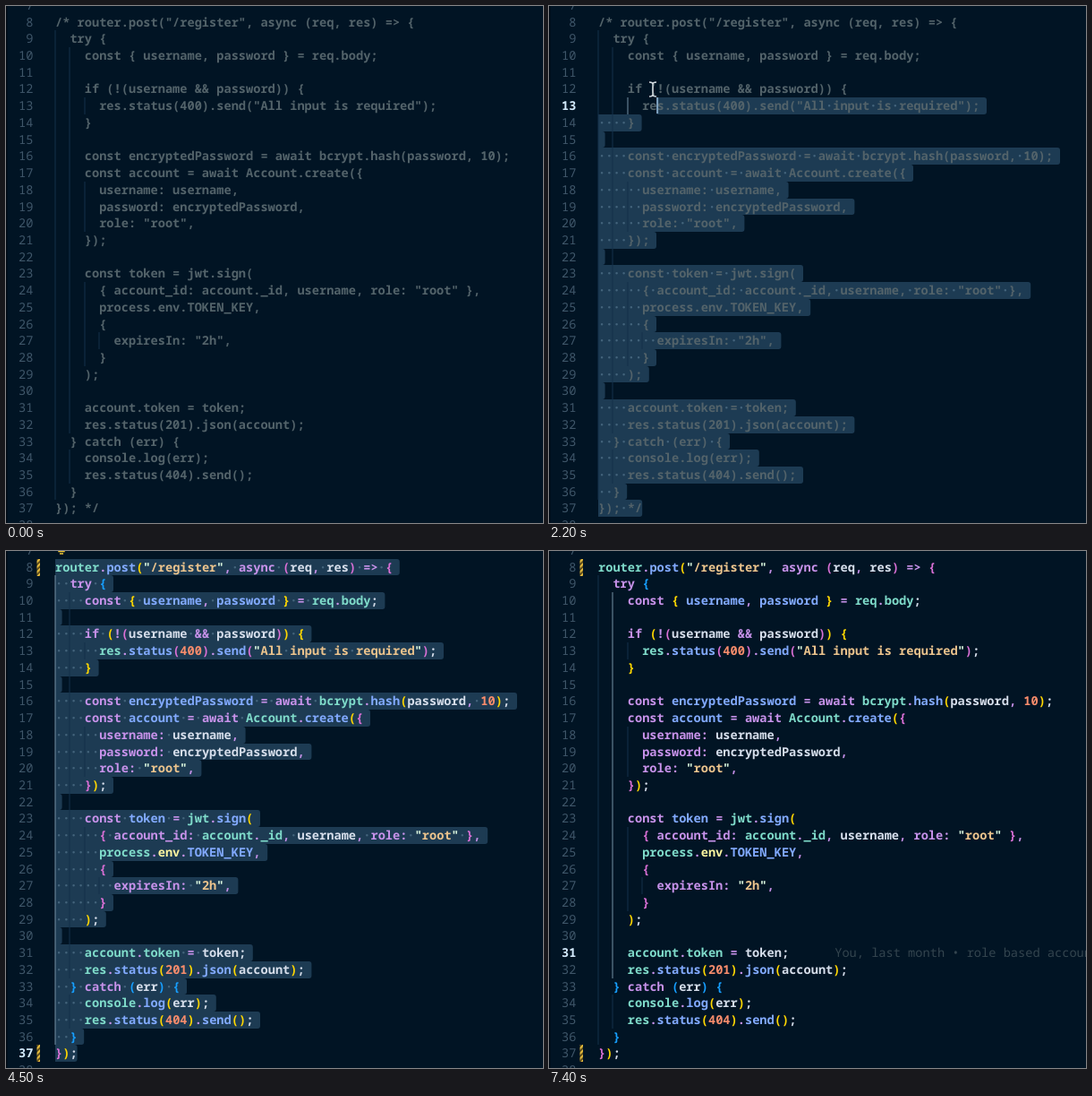
Animation, 600 px wide and 577 px high, one loop 7.5 s. Source, as an HTML page:

```html
<!DOCTYPE html>
<html lang="en">
<head>
<meta charset="utf-8">
<title>Uncommenting a route</title>
<style>
  html, body { margin: 0; width: 100%; height: 100%; overflow: hidden; background: #011424; }
  svg { display: block; width: 600px; height: 577px; }
  text {
    font: 600 13.67px "Noto Sans Mono", "DejaVu Sans Mono", monospace;
    font-variant-ligatures: none;
    white-space: pre;
    text-rendering: geometricPrecision;
  }
  #plain text { fill: #53636a; }
  #numbers text { fill: #3f5669; font-weight: 500; }
  #numbers text.on { fill: #d3eafc; font-weight: 700; }
  #dots text { fill: #44647c; }
  #selection { fill: #1d3b53; }
  #guides rect { fill: #14304a; }
  #guides rect.on { fill: #7690a3; }
  #blame { fill: #34454f; font-weight: 500; }
</style>
</head>
<body>
<svg id="stage" viewBox="0 0 600 577">
  <defs>
    <pattern id="stripes" width="4" height="4" patternUnits="userSpaceOnUse" patternTransform="rotate(-45)">
      <rect width="4" height="4" fill="#4b3d16"/><rect width="4" height="2.3" fill="#e2b93d"/>
    </pattern>
  </defs>
  <rect width="600" height="577" fill="#011424"/>
  <rect width="1.5" height="577" fill="#010a14"/>
  <path id="selection"/>
  <g id="guides"></g>
  <g id="dots"></g>
  <g id="boxes" fill="#17324a" stroke="#8a8f91"></g>
  <g id="numbers"></g>
  <g id="plain"></g>
  <g id="coloured"></g>
  <g id="bars" fill="url(#stripes)"></g>
  <text id="blame">You, last month • role based accounts</text>
  <path id="fold" d="M40 16l4 4 4-4" fill="none" stroke="#8296a5" stroke-width="1.2"/>
  <path id="bulb" d="M59 -4v4.5h6v-4.5M60 3h4" fill="none" stroke="#f0c634" stroke-width="1.4"/>
  <rect id="caret" width="2" height="18" fill="#80a4c2"/>
  <path id="mouse" d="M-4 -8q4 0 4 2.5q0 -2.5 4 -2.5M0 -6V6M-4 8q4 0 4 -2.5q0 2.5 4 2.5" fill="none" stroke="#d5dbe0" stroke-width="1.5"/>
</svg>
<script>
const LOOP = 7500, STEP = 100;
const LEFT = 55, CHAR = 8.2, ROW = 18.72, FIRST = 8, LAST = 37;
const UNCOMMENT = 3900, CLICK = 4700;

const code = `router.post("/register", async (req, res) => {
  try {
    const { username, password } = req.body;

    if (!(username && password)) {
      res.status(400).send("All input is required");
    }

    const encryptedPassword = await bcrypt.hash(password, 10);
    const account = await Account.create({
      username: username,
      password: encryptedPassword,
      role: "root",
    });

    const token = jwt.sign(
      { account_id: account._id, username, role: "root" },
      process.env.TOKEN_KEY,
      {
        expiresIn: "2h",
      }
    );

    account.token = token;
    res.status(201).json(account);
  } catch (err) {
    console.log(err);
    res.status(404).send();
  }
});`.split("\n");
const commented = code.slice();
commented[0] = "/* " + code[0];
commented[code.length - 1] += " */";

// column, first line, last line
const guideSpans = [[0, 9, 36], [2, 10, 32], [2, 34, 35], [4, 13, 13], [4, 18, 20], [4, 24, 28], [6, 27, 27]];

// time, caret line, caret column
const dragSteps = [[1000, 37, 6], [1300, 34.5, 6], [1600, 29, 6], [1800, 25, 6],
  [2000, 19, 7], [2200, 13, 8], [2400, 9, 7], [2500, 8, 6], [2600, 8, 0]];
// time, x, y
const mouseSteps = [[200, 300, 470], [800, 112, 561], [1000, 106, 561], [1300, 108, 498], [1600, 110, 395],
  [1800, 112, 320], [2000, 114, 206], [2200, 116, 93], [2500, 110, 20], [2800, 70, 8], [3200, 92, 52], [3500, 109, 75]];

const $ = id => document.getElementById(id);
const xAt = col => LEFT + col * CHAR;
const topOf = line => Math.round(8.6 + (line - FIRST) * ROW);
const baseOf = line => 22.6 + (line - FIRST) * ROW;

function add(parent, tag, attrs, text = "") {
  const el = document.createElementNS("http://www.w3.org/2000/svg", tag);
  for (const k in attrs) el.setAttribute(k, attrs[k]);
  el.textContent = text;
  parent.append(el);
  return el;
}
const show = (id, on) => { $(id).style.display = on ? "" : "none"; };

function along(steps, t) {
  if (t <= steps[0][0]) return steps[0].slice(1);
  for (let i = 1; i < steps.length; i++) {
    const [a, ...p] = steps[i - 1], [b, ...q] = steps[i];
    if (t <= b) return p.map((v, k) => v + (q[k] - v) * (t - a) / (b - a));
  }
  return steps[steps.length - 1].slice(1);
}

const PURPLE = "#c792ea", BLUE = "#82aaff", TEAL = "#7fdbca", TEXT = "#d6deeb";
const brackets = ["#ffd700", "#da70d6", "#179fff"];
const keywords = /^(async|await|const|if|try|catch)$/;
let depth = 0;

function colourOf(word, before, after) {
  if (/^\d/.test(word)) return "#f78c6c";
  if (/^[({]$/.test(word)) return brackets[depth++ % 3];
  if (/^[)}]$/.test(word)) return brackets[--depth % 3];
  if (word === '"') return "#d9f5dd";
  if (keywords.test(word) || /^[=>&!.,:]+$/.test(word)) return PURPLE;
  if (!/^\w/.test(word)) return TEXT;
  if (word === "env") return "#faf39f";
  if (word === "TOKEN_KEY" || after[0] === "(" || /const (\{[^}]*)?$/.test(before)) return BLUE;
  if (after[0] === ":") return PURPLE;
  if (after[0] === "." || before.endsWith(".")) return TEAL;
  return TEXT;
}

function paint(line, el) {
  const span = (s, fill) => add(el, "tspan", { fill }, s);
  for (const m of line.matchAll(/"[^"]*"|\w+|=>|&&|\s+|./g)) {
    const s = m[0];
    if (s[0] === '"') {
      span('"', "#d9f5dd");
      span(s.slice(1, -1), "#ecc48d");
      span('"', "#d9f5dd");
    } else {
      span(s, colourOf(s, line.slice(0, m.index), line.slice(m.index + s.length)));
    }
  }
}

const numbers = {}, dots = {};
for (let n = FIRST - 1; n <= LAST + 1; n++) {
  numbers[n] = add($("numbers"), "text", { x: 14 + (n < 10 ? CHAR : 0), y: baseOf(n) }, n);
}
code.forEach((line, i) => {
  const pos = { x: LEFT, y: baseOf(FIRST + i) };
  add($("plain"), "text", pos, commented[i]);
  paint(line, add($("coloured"), "text", pos));
  dots[FIRST + i] = add($("dots"), "text", pos);
});
const guides = guideSpans.map(([col, a, b]) =>
  add($("guides"), "rect", { x: Math.round(xAt(col)) - 0.5, y: topOf(a), width: 1, height: topOf(b + 1) - topOf(a) }));
for (const [line, col] of [[9, 6], [33, 2]]) {
  add($("boxes"), "rect", { x: xAt(col) - 0.3, y: topOf(line) + 0.5, width: CHAR + 0.6, height: 17.5 });
}
for (const line of [FIRST, LAST]) {
  add($("bars"), "rect", { x: 34.5, y: topOf(line), width: 3.5, height: 19 });
}

// Editor state: active line, caret place and the moment its blinking began
function stateAt(t) {
  if (t < 1000) return null;
  if (t < UNCOMMENT) {
    const [l, c] = along(dragSteps, t), line = Math.round(l);
    return { line, col: Math.min(Math.round(c), commented[line - FIRST].length), since: Math.max(2600, t - (t < 2600 ? 0 : t)), from: line };
  }
  if (t < CLICK) return { line: LAST, col: 3, since: UNCOMMENT, from: FIRST };
  return { line: 31, col: 26, since: CLICK, from: 0 };
}

function drawSelection(lines, from, col) {
  let d = "";
  for (let n = FIRST; n <= LAST; n++) {
    const text = lines[n - FIRST], start = n === from ? col : 0;
    const on = from && n >= from;
    dots[n].textContent = on ? text.replace(/./g, (c, i) => c === " " && i >= start ? "·" : " ") : "";
    if (!on) continue;
    const x = xAt(start), right = xAt(text.length) + (n < LAST ? 7.6 : 0);
    if (right - x < 4) continue;
    const y = topOf(n), h = topOf(n + 1) - y;
    d += `M${x} ${y}H${right - 3}q3 0 3 3v${h - 6}q0 3 -3 3H${x}Z`;
  }
  $("selection").setAttribute("d", d);
}

function draw(t) {
  const state = stateAt(t), live = t >= UNCOMMENT;
  const lines = live ? code : commented;
  show("plain", !live);
  show("coloured", live);
  show("bars", live);

  const from = state ? state.from : 0;
  drawSelection(lines, from, live || !state ? 0 : state.col);

  const line = state ? state.line : 0;
  for (const n in numbers) numbers[n].classList.toggle("on", +n === line);
  let active = line ? 0 : -1;
  guideSpans.forEach(([, a, b], i) => { if (line >= a && line <= b) active = i; });
  guides.forEach((g, i) => g.classList.toggle("on", i === active));

  const lit = state && (t < state.since || Math.floor((t - state.since) / 500) % 2 === 0);
  show("caret", lit);
  if (lit) {
    $("caret").setAttribute("x", xAt(state.col) - 0.5);
    $("caret").setAttribute("y", topOf(line));
  }

  const blame = (t >= 2800 && t < UNCOMMENT) || t >= 6000;
  show("blame", blame);
  if (blame) {
    $("blame").setAttribute("x", xAt(lines[line - FIRST].length) + 51);
    $("blame").setAttribute("y", baseOf(line));
  }

  show("boxes", t >= CLICK && t < 7300);
  show("fold", t >= 3200 && t < UNCOMMENT);
  show("bulb", t >= 4300 && t < CLICK);
  show("mouse", t >= 200 && t < UNCOMMENT);
  $("mouse").setAttribute("transform", `translate(${along(mouseSteps, t)})`);
}

let last = -1;
function tick() {
  const t = Math.floor(performance.now() % LOOP / STEP) * STEP;
  if (t !== last) draw(last = t);
  requestAnimationFrame(tick);
}
tick();
</script>
</body>
</html>
```
